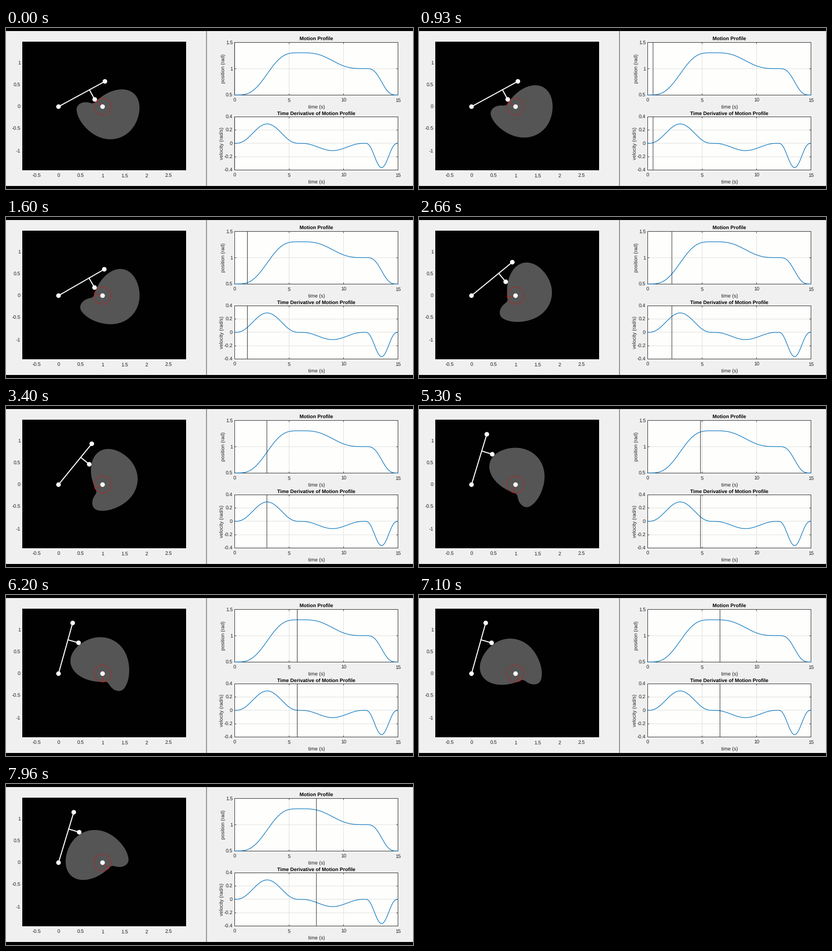
Recreate the animation shown at these times as a matplotlib script. Size 800 px wide and 318 px high, loop 8 s.

```python
import numpy as np
import matplotlib.pyplot as plt
from matplotlib.animation import FuncAnimation
from matplotlib.patches import Circle, Polygon, Rectangle

W, H, DPI = 800, 318, 100
FRAMES, STEP = 250, 32          # 8 s loop
PX = 72 / DPI                   # points per pixel
INK, FRAME, GRID = "#202020", "#333333", "#e0e0e0"
BLUE, RED = "#0a76c0", "#dc1010"

# Mechanism dimensions
ARM, REACH, DROP, ROLLER = 1.2, 0.8, 0.25, 0.05
PIVOT = 1.0 + 0j
OMEGA = 2 * np.pi / 15
SEGMENTS = [(0, 6, 0.5, 1.3), (6, 12, 1.3, 1.0), (12, 15, 1.0, 0.5)]

plt.rcParams["font.family"] = "Liberation Sans"
plt.rcParams["text.hinting"] = "none"
fig = plt.figure(figsize=(W / DPI, H / DPI), dpi=DPI, facecolor="#f0f0f0")
ax = fig.add_axes([0, 0, 1, 1])
ax.set(xlim=(0, W), ylim=(H, 0))
ax.axis("off")


def profile(t):
    """Position and velocity from 4-5-6-7 polynomial segments."""
    t = np.asarray(t, float)
    pos, vel = np.full(t.shape, 0.5), np.zeros(t.shape)
    for a, b, p, q in SEGMENTS:
        u = (t - a) / (b - a)
        on = (u >= 0) & (u <= 1)
        s = u**4 * (35 - 84 * u + 70 * u**2 - 20 * u**3)
        pos = np.where(on, p + (q - p) * s, pos)
        vel = np.where(on, (q - p) / (b - a) * 140 * (u * (1 - u))**3, vel)
    return pos, vel


def follower(t):
    return (REACH - 1j * DROP) * np.exp(1j * profile(t)[0])


def to_px(z):
    z = np.atleast_1d(z)
    return 103.2 + 86.6 * z.real, 155.3 - 86.6 * z.imag


def mid(v):
    """Centre of the pixel that holds v."""
    return np.floor(v) + 0.5


def rect(x, y, w, h, color):
    ax.add_patch(Rectangle((x, y), w, h, fc=color, lw=0))


def line(x, y, color, width=1.0, **kw):
    return ax.plot(x, y, color=color, lw=width * PX, snap=False, **kw)[0]


def rule(x, y, color, **kw):
    """Crisp one-pixel line."""
    return line(mid(x), mid(y), color, solid_capstyle="butt", **kw)


def label(x, y, s, ha="center", **kw):
    kw = {"va": "baseline", "color": INK, **kw}
    return ax.text(x, y, s, ha=ha, fontsize=9.85 * PX, **kw)


def dot(z):
    x, y = to_px(z)
    return ax.add_patch(Circle((x[0], y[0]), 4.5, fc="white", lw=0, zorder=6))


def time_x(t):
    return 449.1 + 321.3 * t / 15


def chart(top, bottom, ticks, title, name, name_x, values):
    lo, hi = ticks[0], ticks[-1]
    left, right = time_x(0), time_x(15)

    def val_y(v):
        return bottom - (bottom - top) * (v - lo) / (hi - lo)

    rect(left, top, right - left, bottom - top, "#fefefc")
    for t in (0, 5, 10, 15):
        x = time_x(t)
        rule([x, x], [top, bottom], GRID)
        for y, d in ((top, 3), (bottom, -3)):
            rule([x, x], [y, y + d], FRAME, zorder=3)
        label(x, bottom + 13.9, str(t))
    for v in ticks:
        y = val_y(v)
        rule([left, right], [y, y], GRID)
        for x, d in ((left, 3), (right, -3)):
            rule([x, x + d], [y, y], FRAME, zorder=3)
        label(445.6, y + 3.7, f"{v:g}", "right")
    rule([left, right, right, left, left], [top, top, bottom, bottom, top],
         FRAME, zorder=3)
    t = np.linspace(0, 15, 400)
    line(time_x(t), val_y(values(t)), BLUE, 1.2, zorder=4)
    label(610, top - 3.7, title, weight="bold", color="black")
    label(610.5, bottom + 26.4, "time (s)")
    label(name_x, (top + bottom) / 2, name, rotation=90, va="center")
    return line([left, left], mid([top, bottom]), "#2c2c2c", zorder=5)


# Window frame
rect(0, 0, W, 6, "black")
rect(0, 311.5, W, 7, "black")
line([394.1, 394.1], [6, 311.5], "#4c4c4c", 1.1)

# Mechanism view
rect(32, 27, 322, 253.5, "#010102")
for v in np.arange(-0.5, 2.6, 0.5):
    label(to_px(v + 0j)[0][0], 295.4, f"{v:g}")
for v in np.arange(-1, 1.1, 0.5):
    label(28.3, to_px(1j * v)[1][0] + 3.7, f"{v:g}", "right")

cursors = [
    chart(28.1, 132.3, (0.5, 1, 1.5), "Motion Profile",
          "position (rad)", 427, lambda t: profile(t)[0]),
    chart(175.2, 280.4, (-0.4, -0.2, 0, 0.2, 0.4),
          "Time Derivative of Motion Profile",
          "velocity (rad/s)", 424.3, lambda t: profile(t)[1]),
]

# Cam outline: roller path in the cam's frame, offset inward by the roller
ts = np.linspace(0, 15, 600)
pitch = (follower(ts) - PIVOT) * np.exp(-1j * OMEGA * ts)
tangent = np.gradient(pitch, ts)
cam_shape = pitch - 1j * ROLLER * tangent / np.abs(tangent)
start = pitch[0] / abs(pitch[0])
base = (abs(pitch[0]) - ROLLER) * start
base_ring = base * np.exp(1j * np.linspace(0, 2 * np.pi, 121))

cam = ax.add_patch(Polygon(np.zeros((3, 2)), fc="#555555", lw=0, zorder=3))
ring = line([], [], RED, zorder=4, ls=(0, (3, 1.4)), dash_capstyle="butt")
spoke = line([], [], RED, 0.9, zorder=4)
arm = line([], [], "white", 2, zorder=5)
stem = line([], [], "white", 2, zorder=5)
dot(0j)
dot(PIVOT)
tip, roller = dot(0j), dot(0j)


def update(k):
    t = 0.0 if k < 15 else k * STEP / 1000 - 0.427
    turn = np.exp(1j * OMEGA * t)
    aim = np.exp(1j * profile(t)[0])
    end, foot, hub = ARM * aim, REACH * aim, follower(t)

    cam.set_xy(np.column_stack(to_px(PIVOT + cam_shape * turn)))
    ring.set_data(*to_px(PIVOT + base_ring * turn))
    spoke.set_data(*to_px(PIVOT + np.array([0, base]) * turn))
    arm.set_data(*to_px(np.array([0, end])))
    stem.set_data(*to_px(np.array([foot, hub])))
    for d, z in ((tip, end), (roller, hub)):
        x, y = to_px(z)
        d.center = x[0], y[0]
    for c in cursors:
        c.set_xdata([time_x(t) + 0.2] * 2)
    return cam, ring, spoke, arm, stem, tip, roller, *cursors


anim = FuncAnimation(fig, update, frames=FRAMES, interval=STEP,
                     repeat=True, repeat_delay=0)
plt.show()
```
